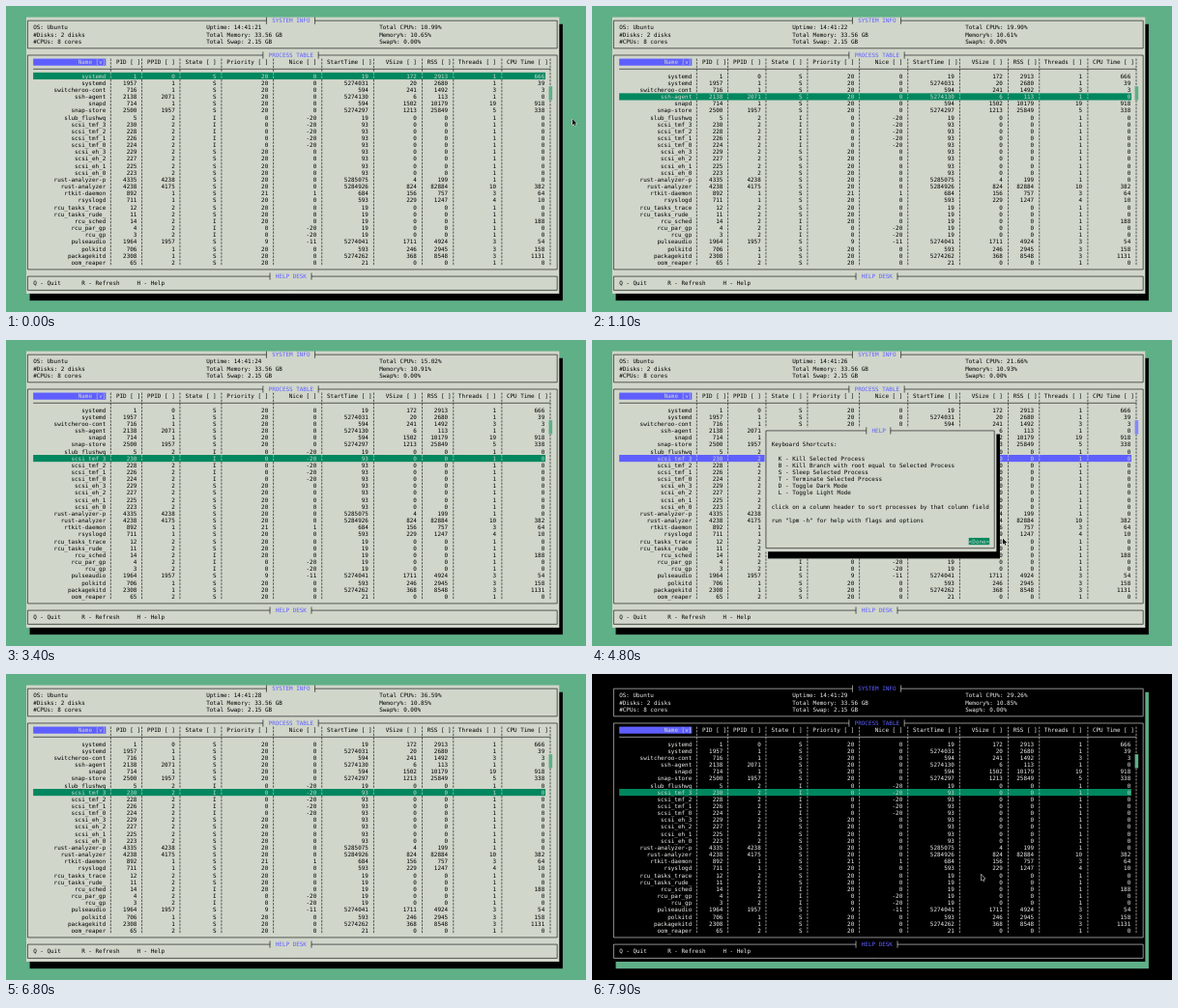
Recreate the animation shown at these times as an HTML page with a canvas. Size 600 by 317 pixels, loop 8000 ms.

```html
<!DOCTYPE html>
<html lang="en">
<head>
<meta charset="utf-8">
<title>Process monitor</title>
<style>
  html, body { margin: 0; width: 100%; height: 100%; overflow: hidden; background: #5faf87; }
  canvas { display: block; }
</style>
</head>
<body>
<canvas id="stage" width="600" height="317"></canvas>
<script>
const ctx = document.getElementById('stage').getContext('2d');

// Terminal grid: left and top edge of the panel, cell width and height
const X0 = 21, Y0 = 11.6, CW = 3.58, CH = 7.16;
const FONT = `${CW / 0.602}px "DejaVu Sans Mono", monospace`;
const GREEN = '#5faf87', PALE = '#d0d6ca', BLUE = '#5f5fff', SELECT = '#00875f';
const LIGHT = { desk: GREEN, panel: PALE, ink: '#000', shadow: '#000' };
const DARK = { desk: '#000', panel: '#000', ink: '#eeeeec', shadow: GREEN };
const LOOP = 8000, STEP = 100;

const COLUMN_ENDS = [23, 32, 43, 55, 70, 84, 99, 113, 122, 136, 150];
const LABELS = ['Name [v]', ...['PID', 'PPID', 'State', 'Priority', 'Nice', 'StartTime',
  'VSize', 'RSS', 'Threads', 'CPU Time'].map(s => s + ' [ ]')];

const scsi = (kind, base, state) =>
  [3, 2, 1, 0].map(k => `scsi_${kind}_${k} ${base + 2 * k} 2 ${state} 93`).join('\n');

// name pid ppid state start [vsize rss threads cpu [priority nice]]
const PROCESSES = `systemd 1 0 S 19 172 2913 1 666
systemd 1957 1 S 5274031 20 2680 1 39
switcheroo-cont 716 1 S 594 241 1492 3 3
ssh-agent 2138 2071 S 5274130 6 113 1 0
snapd 714 1 S 594 1502 10179 19 918
snap-store 2500 1957 S 5274297 1213 25849 5 338
slub_flushwq 5 2 I 19
${scsi('tmf', 224, 'I')}
${scsi('eh', 223, 'S')}
rust-analyzer-p 4335 4238 S 5285075 4 199 1 0
rust-analyzer 4238 4175 S 5284926 824 82884 10 382
rtkit-daemon 892 1 S 684 156 757 3 64 21 1
rsyslogd 711 1 S 593 229 1247 4 10
rcu_tasks_trace 12 2 S 19
rcu_tasks_rude_ 11 2 S 19
rcu_sched 14 2 I 19 0 0 1 188 20 0
rcu_par_gp 4 2 I 19
rcu_gp 3 2 I 19
pulseaudio 1964 1957 S 5274041 1711 4924 3 54 9 -11
polkitd 706 1 S 593 246 2945 3 158
packagekitd 2308 1 S 5274262 368 8548 3 1131
oom_reaper 65 2 S 21`;

const HELP = [
  [46, 13, 'Keyboard Shortcuts:'],
  [48, 15, 'K - Kill Selected Process'],
  [48, 16, 'B - Kill Branch with root equal to Selected Process'],
  [48, 17, 'S - Sleep Selected Process'],
  [48, 18, 'T - Terminate Selected Process'],
  [48, 19, 'D - Toggle Dark Mode'],
  [48, 20, 'L - Toggle Light Mode'],
  [46, 22, 'click on a column header to sort processes by that column field'],
  [46, 24, 'run "lpm -h" for help with flags and options'],
];

// CPU and memory load for each second
const LOAD = ['10.99 10.65', '19.90 10.61', '14.49 10.83', '15.02 10.91', '18.92 10.92',
  '21.66 10.93', '28.41 10.87', '36.59 10.85', '29.26 10.85'].map(s => s.split(' '));
const CLOCK_LEAD = 400;
const KEY_TIMES = [500, 800, 1000, 1300, 1500, 1700, 1900];
const HELP_OPEN = 3600, HELP_CLOSE = 5200, GO_DARK = 6900;

// Right-aligns each value in its column; labels may reach up to the separator
function tableLine(values) {
  return values.reduce((line, v, i) => {
    const end = COLUMN_ENDS[i];
    return (line + ` ${v}`.padStart(end - line.length)).padEnd(end + 2);
  }, '');
}

function processLine(record) {
  const [name, pid, ppid, state, start, vsize = 0, rss = 0, threads = 1, cpu = 0,
    priority = state === 'S' ? 20 : 0, nice = state === 'S' ? 0 : -20] = record.split(' ');
  return tableLine([name, pid, ppid, state, priority, nice, start, vsize, rss, threads, cpu]);
}

const HEADER = tableLine(LABELS);
const ROWS = PROCESSES.split('\n').map(processLine);

const px = c => X0 + c * CW;
const py = r => Y0 + r * CH;
const midX = c => px(c + 0.4);
const midY = r => py(r + 0.5);

function fill(c, r, w, h, color) {
  ctx.fillStyle = color;
  ctx.fillRect(px(c), py(r), w * CW, h * CH);
}

function text(c, r, s, color) {
  ctx.fillStyle = color;
  ctx.fillText(s, px(c), midY(r) + 2.1);
}

function lines(paths, color, dash = []) {
  ctx.save();
  ctx.strokeStyle = color;
  ctx.globalAlpha = 0.75;
  ctx.lineWidth = 0.8;
  ctx.setLineDash(dash);
  ctx.beginPath();
  for (const [first, ...rest] of paths) {
    ctx.moveTo(...first);
    for (const p of rest) ctx.lineTo(...p);
  }
  ctx.stroke();
  ctx.restore();
}

function separators(r, h, color, ends = COLUMN_ENDS) {
  const paths = ends.map(end => [[midX(end + 1), py(r)], [midX(end + 1), py(r + h)]]);
  lines(paths, color, [CH / 3, CH / 6]);
}

function shadowed(c, r, w, h, theme) {
  fill(c + 1, r + 1, w, h, theme.shadow);
  fill(c, r, w, h, theme.panel);
}

function frame(c, r, w, h, title, theme) {
  const left = midX(c), right = midX(c + w - 1);
  const top = midY(r), bottom = midY(r + h - 1);
  const start = c + Math.floor((w - title.length) / 2);
  const tickL = midX(start - 2), tickR = midX(start + title.length + 1);
  const tick = x => [[x, py(r)], [x, py(r + 1)]];
  lines([
    [[tickL, top], [left, top], [left, bottom], [right, bottom], [right, top], [tickR, top]],
    tick(tickL), tick(tickR),
  ], theme.ink);
  text(start, r, title, BLUE);
}

function drawInfo(t, theme) {
  const second = Math.floor((t + CLOCK_LEAD) / 1000);
  const [cpu, memory] = LOAD[second];
  frame(0, 0, 154, 5, 'SYSTEM INFO', theme);
  const blocks = [
    [2, ['OS: Ubuntu', '#Disks: 2 disks', '#CPUs: 8 cores']],
    [52, [`Uptime: 14:41:${21 + second}`, 'Total Memory: 33.56 GB', 'Total Swap: 2.15 GB']],
    [102, [`Total CPU%: ${cpu}%`, `Memory%: ${memory}%`, 'Swap%: 0.00%']],
  ];
  for (const [c, rows] of blocks)
    rows.forEach((s, i) => text(c, 1 + i, s, theme.ink));
}

function drawTable(t, theme, helpOpen) {
  const selected = KEY_TIMES.filter(k => t >= k).length;
  frame(0, 5, 154, 32, 'PROCESS TABLE', theme);
  text(0, 6, HEADER, theme.ink);
  fill(2, 6, 21, 1, BLUE);
  text(15, 6, LABELS[0], PALE);
  lines([[[px(2), midY(7)], [px(151.5), midY(7)]]], theme.ink);
  separators(6, 30, theme.ink);
  fill(2, 8 + selected, 148, 1, helpOpen ? BLUE : SELECT);
  separators(8 + selected, 1, PALE, COLUMN_ENDS.slice(0, -1));
  ROWS.forEach((s, i) => text(0, 8 + i, s, i === selected ? PALE : theme.ink));
  fill(151, 10, 1, 2, helpOpen ? '#8787ff' : GREEN);
}

function drawHelp(theme) {
  shadowed(44, 11, 67, 18, theme);
  frame(44, 11, 67, 18, 'HELP', theme);
  for (const [c, r, s] of HELP) text(c, r, s, theme.ink);
  fill(103, 27, 6, 1, SELECT);
  text(103, 27, '<Done>', PALE);
}

// The pointer hides while keys are typed and returns when the mouse moves
function pointerAt(t) {
  const rest = [586, 117], nearButton = [425, 205.5], button = [402.5, 207.5];
  const glide = (a, b, from, to) => {
    const u = Math.min(1, Math.max(0, (t - from) / (to - from)));
    const e = u * u * (3 - 2 * u);
    return a.map((v, i) => v + (b[i] - v) * e);
  };
  if (t < KEY_TIMES[0]) return rest;
  if (t < 4000) return null;
  if (t < 4800) return glide(rest, nearButton, 4000, 4800);
  if (t < 6800) return glide(nearButton, button, 4800, 5000);
  return t < 7900 ? null : button;
}

function drawPointer([x, y]) {
  const shape = [[0, 0], [0, 6.3], [1.5, 5], [2.5, 7.2], [3.5, 6.8], [2.5, 4.7], [4.4, 4.5]];
  ctx.beginPath();
  for (const [dx, dy] of shape) ctx.lineTo(x + dx, y + dy);
  ctx.closePath();
  ctx.strokeStyle = '#fff';
  ctx.lineWidth = 0.9;
  ctx.stroke();
  ctx.fillStyle = '#111';
  ctx.fill();
}

function draw(t) {
  const theme = t < GO_DARK ? LIGHT : DARK;
  const helpOpen = t >= HELP_OPEN && t < HELP_CLOSE;
  ctx.font = FONT;
  ctx.textRendering = 'geometricPrecision';
  ctx.fillStyle = theme.desk;
  ctx.fillRect(0, 0, 600, 317);
  shadowed(0, 0, 154, 40, theme);
  drawInfo(t, theme);
  drawTable(t, theme, helpOpen);
  frame(0, 37, 154, 3, 'HELP DESK', theme);
  text(2, 38, 'Q - Quit      R - Refresh     H - Help', theme.ink);
  if (helpOpen) drawHelp(theme);
  const pointer = pointerAt(t);
  if (pointer) drawPointer(pointer);
}

function tick() {
  draw(Math.floor(performance.now() % LOOP / STEP) * STEP);
  requestAnimationFrame(tick);
}
tick();
</script>
</body>
</html>
```
